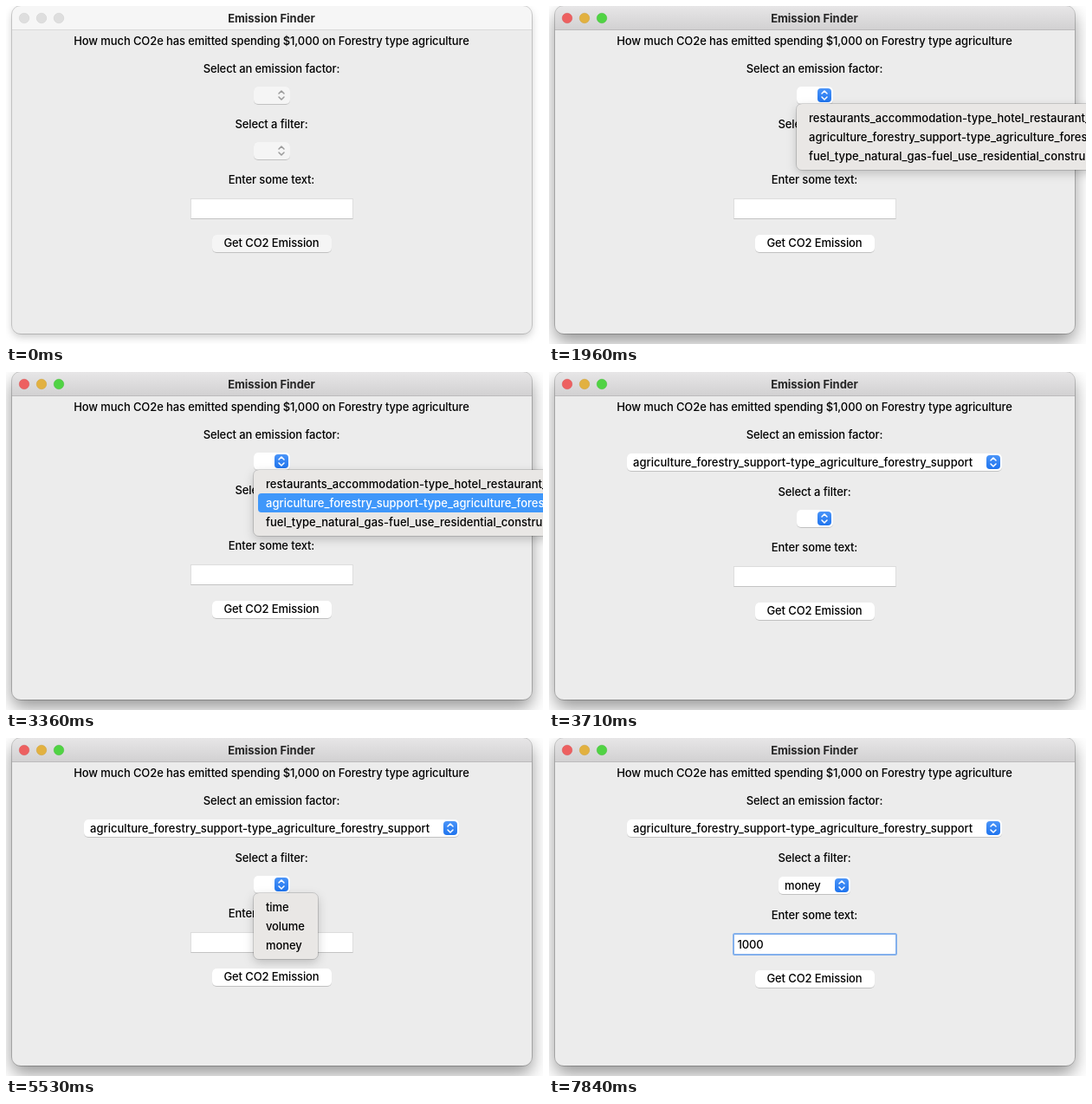
Animation, 620 px wide and 390 px high, one loop 8 s. Source, as an HTML page:

```html
<!DOCTYPE html>
<html lang="en">
<head>
<meta charset="utf-8">
<title>Emission Finder</title>
<style>
  html, body { margin: 0; width: 100%; height: 100%; overflow: hidden; background: #fff; }
  svg { display: block; }
  text { font: 500 13px Inter, "Open Sans", sans-serif; letter-spacing: -0.11px; fill: #000; white-space: pre; }
  .title { font-weight: 700; letter-spacing: -0.02px; fill: #262626; }
  .key { letter-spacing: 0.02px; }
  .mid { text-anchor: middle; }
</style>
</head>
<body>
<svg id="stage" width="620" height="390" viewBox="0 0 620 390">
  <defs>
    <filter id="soft" x="-20%" y="-20%" width="140%" height="150%">
      <feDropShadow dx="0" dy="4" stdDeviation="5" flood-opacity=".2"/>
    </filter>
    <filter id="deep" x="-20%" y="-20%" width="140%" height="150%">
      <feDropShadow dx="0" dy="9" stdDeviation="10" flood-opacity=".42"/>
    </filter>
    <filter id="menuShade" x="-50%" y="-50%" width="200%" height="220%">
      <feDropShadow dx="0" dy="4" stdDeviation="6" flood-opacity=".2"/>
    </filter>
    <filter id="lift" x="-10%" y="-20%" width="120%" height="150%">
      <feDropShadow dx="0" dy=".5" stdDeviation=".6" flood-opacity=".36"/>
    </filter>
    <linearGradient id="blue" x2="0" y2="1">
      <stop stop-color="#4a94f8"/><stop offset="1" stop-color="#1f74ee"/>
    </linearGradient>
    <linearGradient id="bar" x2="0" y2="1">
      <stop stop-color="#e7e6e7"/><stop offset="1" stop-color="#d2d1d2"/>
    </linearGradient>
  </defs>
  <g id="view"></g>
</svg>
<script>
const LOOP = 8000;
const FACTORS = [
  'restaurants_accommodation-type_hotel_restaurant_accommodation',
  'agriculture_forestry_support-type_agriculture_forestry_support',
  'fuel_type_natural_gas-fuel_use_residential_construction'
];
const FILTERS = ['time', 'volume', 'money'];

// Each step changes part of the interface state and holds until the next.
const STEPS = [
  [0, { front: 0, active: 0, menu: 0, row: -1, fade: 1, factor: '', filter: '', focus: 0, caret: 0, typed: '' }],
  [1260, { front: 1 }],
  [1330, { active: 1 }],
  [1960, { menu: 1 }],
  [2730, { row: 0 }],
  [2800, { row: 1 }],
  [3220, { row: -1 }],
  [3360, { row: 1 }],
  [3430, { fade: .85 }],
  [3500, { fade: .6, factor: FACTORS[1] }],
  [3570, { fade: .35 }],
  [3640, { fade: .12 }],
  [3710, { menu: 0, row: -1, fade: 1 }],
  [4340, { menu: 2 }],
  [4760, { row: 0 }],
  [4900, { row: 1 }],
  [5040, { row: 2 }],
  [5460, { row: -1 }],
  [5600, { row: 2 }],
  [5670, { fade: .85 }],
  [5740, { fade: .6, filter: FILTERS[2] }],
  [5810, { fade: .35 }],
  [5880, { fade: .12 }],
  [5950, { menu: 0, row: -1, fade: 1 }],
  [6300, { focus: 1, caret: 1 }],
  [6930, { caret: 0, typed: '1' }],
  [7210, { caret: 1 }],
  [7280, { typed: '10' }],
  [7350, { typed: '100' }],
  [7490, { typed: '1000' }],
  [7840, { caret: 0 }]
];

const rect = (x, y, w, h, r, fill, more = '') =>
  `<rect x="${x}" y="${y}" width="${w}" height="${h}" rx="${r}" fill="${fill}" ${more}/>`;
const text = (x, y, s, cls = '', more = '') => `<text x="${x}" y="${y}" class="${cls}" ${more}>${s}</text>`;
const label = (y, s, cls = '') => text(306.5, y, s, 'mid ' + cls);
const option = (x, y, s, more) => text(x, y, s, s.includes('_') ? 'key' : '', more);

function windowFrame(front) {
  const lights = front ? ['#ed6060', '#e2b140', '#50d343'] : Array(3).fill('#dedede');
  const rims = front ? ['#d94f50', '#cf9f33', '#41bd36'] : Array(3).fill('#cdcdcd');
  return rect(7, 0, 600, 378, 10, '#ececec', `filter="url(#${front ? 'deep' : 'soft'})"`) +
    `<path d="M7 27V10A10 10 0 0 1 17 0H597A10 10 0 0 1 607 10V27Z" fill="${front ? 'url(#bar)' : '#f6f6f6'}"/>` +
    rect(7, 27, 600, 1, 0, front ? '#bcbbbc' : '#d9d9d9') +
    rect(6.5, -.5, 601, 379, 10.5, 'none', `stroke="#000" stroke-opacity="${front ? .2 : .17}"`) +
    lights.map((c, i) => `<circle cx="${21 + 20 * i}" cy="14" r="5.75" fill="${c}" stroke="${rims[i]}" stroke-width=".5"/>`).join('') +
    label(18.5, 'Emission Finder', 'title');
}

const face = (x, y, w, active) =>
  rect(x, y, w, 20, 5, active ? '#fff' : '#f5f5f5', 'filter="url(#lift)"');

function popup(x, y, w, active, value) {
  const cx = x + w - 10, cy = y + 10;
  return face(x, y, w, active) +
    (active ? rect(cx - 8, cy - 8, 16, 16, 4, 'url(#blue)') : '') +
    `<path d="M${cx - 3} ${cy - 2}l3 -3l3 3M${cx - 3} ${cy + 2}l3 3l3 -3" fill="none" stroke="${active ? '#fff' : '#9b9b9b'}"
      stroke-width="1.5" stroke-linecap="round" stroke-linejoin="round"/>` +
    option(x + 7, y + 14.5, value);
}

function entry(y, s) {
  return rect(213.5, y, 187, 23, 0, '#fff', 'stroke="#d8d8d8" stroke-width=".8"') +
    (s.focus
      ? rect(213, y - .5, 188, 24, 1.5, 'none', 'stroke="#83b0ec" stroke-width="2"')
      : rect(213.5, y + 22.5, 187, 1, 0, '#c3c3c3')) +
    text(217.5, y + 16.5, s.typed) +
    (s.caret ? rect(217 + 8.2 * s.typed.length, y + 4, 1, 16, 0, '#000') : '');
}

function menu(y, w, items, s) {
  return `<g opacity="${s.fade}">` +
    rect(286, y, w, 76, 6, '#e9e7e5', 'filter="url(#menuShade)"') +
    rect(285.5, y - .5, w + 1, 77, 6.5, 'none', 'stroke="#000" stroke-opacity=".14"') +
    items.map((name, i) => {
      const on = i === s.row, top = y + 5 + 22 * i;
      return (on ? rect(291, top, w - 10, 22, 4, '#3f97fa') : '') +
        option(300, top + 16, name, on ? 'style="fill:#fff"' : '');
    }).join('') + '</g>';
}

function draw(s) {
  const a = s.factor ? 1 : 0;
  const shift = 2 * a + (s.filter ? 2 : 0);
  return windowFrame(s.front) +
    label(45, 'How much CO2e has emitted spending $1,000 on Forestry type agriculture') +
    label(77, 'Select an emission factor:') +
    (a ? popup(90, 94, 433, s.active, s.factor) : popup(286, 93, 42, s.active, '')) +
    label(141 + 2 * a, 'Select a filter:') +
    (s.filter ? popup(265, 160, 83, s.active, s.filter) : popup(286, 157 + 2 * a, 42, s.active, '')) +
    label(205 + shift, 'Enter some text:') +
    entry(222.5 + shift, s) +
    face(238, 264 + shift, 138, s.active) +
    label(278 + shift, 'Get CO2 Emission') +
    (s.menu === 1 ? menu(113, 440, FACTORS, s) : s.menu === 2 ? menu(179, 74, FILTERS, s) : '');
}

const view = document.getElementById('view');
const start = performance.now();
let shown = -1;

function tick() {
  const t = (performance.now() - start) % LOOP;
  const past = STEPS.filter(([at]) => at <= t);
  if (past.length !== shown) {
    shown = past.length;
    view.innerHTML = draw(Object.assign({}, ...past.map(([, change]) => change)));
  }
  requestAnimationFrame(tick);
}
tick();
</script>
</body>
</html>
```
